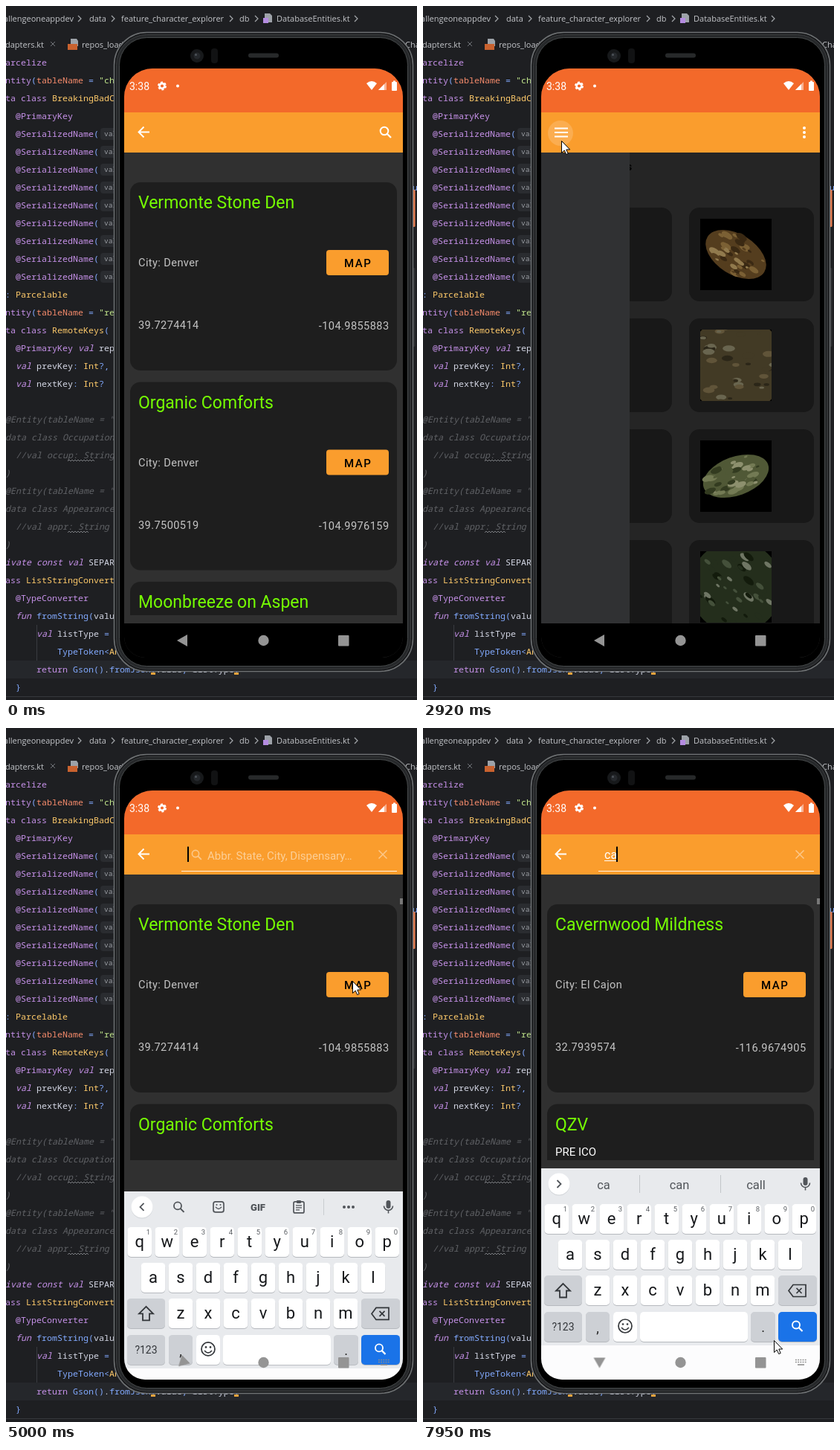
These frames come from a looping animation (553 px wide and 933 px high, 8000 ms). An HTML page:

```html
<!DOCTYPE html>
<html lang="en">
<head>
<meta charset="utf-8">
<title>Dispensary search</title>
<style>
html, body { margin: 0; width: 100%; height: 100%; overflow: hidden; background: #1e1f22; }
svg { display: block; }
text { white-space: pre; }
.code { font: 11.67px "Noto Sans Mono", monospace; fill: #d5d8e6; }
.ide { font: 11px "Open Sans", sans-serif; fill: #c3c5c9; }
.app { font-family: Roboto, sans-serif; }
.kw { fill: #c792ea; }
.it { fill: #c792ea; font-style: italic; }
.type { fill: #ffcb6b; }
.fn { fill: #82aaff; }
.arg { fill: #f78c6c; }
.str { fill: #c3e88d; }
.note { fill: #606266; font-style: italic; }
.title { font-size: 23px; fill: #76ff03; }
.info { font-size: 14.6px; letter-spacing: .4px; fill: #c4c4c4; }
.map { font-size: 15px; font-weight: 500; letter-spacing: 1.5px; fill: #000; }
</style>
</head>
<body>
<script>
const LOOP = 8000;
const ORANGE = '#fa9d2d';
let css = '';

// Timing: all keyframes are written in milliseconds of the loop
function animate(id, frames, ease = 'linear') {
  const steps = frames.map(([ms, rule]) => `${ms / LOOP * 100}%{${rule}}`).join('');
  css += `#${id}{animation:${id} ${LOOP}ms ${ease} infinite}@keyframes ${id}{${steps}}`;
}

function show(id, ...spans) {
  const frames = [];
  if (spans[0][0] > 0) frames.push([0, 'opacity:0']);
  for (const [from, to] of spans) {
    frames.push([from, 'opacity:1']);
    if (to < LOOP) frames.push([to, 'opacity:0']);
  }
  const last = frames[frames.length - 1][1];
  animate(id, [...frames, [LOOP, last]], 'step-end');
}

// Drawing helpers
const g = (id, ...parts) => `<g id="${id}">${parts.join('')}</g>`;
const rect = (x, y, w, h, fill, r = 0, more = '') =>
  `<rect x="${x}" y="${y}" width="${w}" height="${h}" rx="${r}" fill="${fill}" ${more}/>`;
const circle = (x, y, r, fill, more = '') => `<circle cx="${x}" cy="${y}" r="${r}" fill="${fill}" ${more}/>`;
const line = (d, color, w = 1, more = '') =>
  `<path d="${d}" fill="none" stroke="${color}" stroke-width="${w}" ${more}/>`;
const shape = (d, fill, more = '') => `<path d="${d}" fill="${fill}" ${more}/>`;
const text = (x, y, str, cls, more = '') => `<text x="${x}" y="${y}" class="${cls}" ${more}>${str}</text>`;
const label = (x, y, str, size, fill, more = '') =>
  text(x, y, str, 'app', `font-size="${size}" fill="${fill}" text-anchor="middle" ${more}`);
const lens = (x, y, r, color, w) =>
  circle(x - 2, y - 2, r, 'none', `stroke="${color}" stroke-width="${w}"`) +
  line(`M${x - 2 + r * .7} ${y - 2 + r * .7}l${r} ${r}`, color, w * 1.15);
const cross = (x, y, r, color, w) =>
  line(`M${x - r} ${y - r}l${2 * r} ${2 * r}m0 ${-2 * r}l${-2 * r} ${2 * r}`, color, w);

// Editor
const source = `@Parcelize
@Entity(tableName = "characters")
data class BreakingBadC
    @PrimaryKey
${'    @SerializedName(\n'.repeat(9)}) : Parcelable
@Entity(tableName = "remote")
data class RemoteKeys(
    @PrimaryKey val rep
    val prevKey: Int?,
    val nextKey: Int?

//@Entity(tableName = "
//data class Occupation
//  //val occup: String
//)
//@Entity(tableName = "
//data class Appearance
//  //val appr: String
//)
private const val SEPAR
class ListStringConvert
    @TypeConverter
    fun fromString(valu
        val listType =
            TypeToken<An
        return Gson().fromJson(value, listType)
    }`.split('\n');

const span = (cls, str) => `<tspan class="${cls}">${str}</tspan>`;
const rules = [
  ['str', /"[^"]*"?/], ['kw', /@\w+|\b(?:data|class|return)\b/], ['it', /\b(?:private|const|val|fun)\b/],
  ['type', /\b(?:Int|Parcelable|BreakingBadC|RemoteKeys|ListStringConvert|An)\b/],
  ['fn', /\b(?:fromString|fromJson|Gson|TypeToken)\b|[(){}<>:=?,]/], ['arg', /\btableName\b/]
];
const lexer = new RegExp(rules.map(([, re]) => `(${re.source})`).join('|'), 'g');
const escape = s => s.replace('<', '&lt;').replace('>', '&gt;');
const paint = src => src.startsWith('//') ? span('note', src)
  : src.replace(lexer, (hit, ...found) => span(rules[found.findIndex(Boolean)][0], escape(hit)));

const squiggle = (x, y, w) => line(`M${x} ${y}` + 'l2 -2l2 2'.repeat(w / 4), '#85878c', .9);
const chevron = x => line(`M${x - 2} 13l4 4l-4 4`, '#a4a7ab', 1.2);

const editor = () => [
  rect(0, 0, 553, 933, '#1e1f22'),
  rect(0, 880, 553, 24, '#25272b'),
  line('M0 928.5H553', '#36383c'),
  line('M41.5 832V880', '#393b40'),
  text(91, 21, 'allengeoneappdev', 'ide', 'text-anchor="end"'),
  text(112, 21, 'data', 'ide'),
  text(155, 21, 'feature_character_explorer', 'ide'),
  text(314, 21, 'db', 'ide'),
  text(364, 21, 'DatabaseEntities.kt', 'ide'),
  ...[99, 144, 303, 337, 471].map(chevron),
  shape('M348 10h7l3 3v9h-10z', '#9da2a8'), rect(346, 16, 7, 7, '#b48ce0'),
  text(51, 56, 'dapters.kt', 'ide', 'text-anchor="end"'),
  cross(63, 51, 3, '#74777c', 1),
  shape('M87 44h8l2 3v7h-10z', '#9da2a8'), rect(83, 51, 13, 8, '#c9622f'),
  text(102, 56, 'repos_load', 'ide'), text(537, 56, 'Cha', 'ide'),
  ...source.map((src, i) => text(-15, 80 + 24 * i, paint(src), 'code')),
  ...Array.from({length: 9}, (_, i) => rect(127, 164 + 24 * i, 40, 16, '#2a2c30', 4) +
    text(132, 175 + 24 * i, 'value:', 'code', 'style="font-size:9.5px;fill:#9b9ea4"')),
  squiggle(83, 612, 36), squiggle(83, 708, 28),
  text(547, 248, 'u', 'code', 'style="fill:#82aaff"')
].join('');

// Phone body
const phone = () => [
  rect(546, 247, 4.5, 50, '#f08050', 1.5), rect(546, 352, 4.5, 106, '#303234', 1.5),
  rect(145.5, 35.5, 402, 859, '#17181a', 44, 'stroke="#6e7173" stroke-width="1.5"'),
  rect(148.5, 38.5, 396, 853, '#26282a', 41, 'stroke="#3c3e40"'),
  rect(152.5, 42.5, 388, 845, '#000', 37, 'stroke="#55585a" stroke-width=".8"'),
  circle(257, 67, 9, '#17191b'), circle(257, 67, 4.5, '#25282c'), circle(255.5, 65.5, 1.5, '#4d5359'),
  rect(276, 57, 9, 20, '#111213', 4), rect(326, 63.5, 41, 6, '#27292a', 3)
].join('');

// Dispensary list
const PITCH = 268.5;
const entry = (i, name, city, lat, lng) => {
  const y = 237 + PITCH * i;
  return text(178, y + 35, name, 'app title') + (city ? text(178, y + 113, `City: ${city}`, 'app info') +
    text(178, y + 197, lat, 'app info') +
    text(515.5, y + 198, lng, 'app info', 'text-anchor="end"') : '');
};
const card = i => rect(167, 237 + PITCH * i, 359, 253, '#1e1e1e', 14) +
  rect(431, 328 + PITCH * i, 84, 34, ORANGE, 4) + text(455, 351 + PITCH * i, 'MAP', 'app map');

const list = () => g('list', card(0), card(1), card(2),
  g('before', entry(0, 'Vermonte Stone Den', 'Denver', '39.7274414', '-104.9855883'),
    entry(1, 'Organic Comforts', 'Denver', '39.7500519', '-104.9976159'),
    entry(2, 'Moonbreeze on Aspen')),
  g('after', entry(0, 'Cavernwood Mildness', 'El Cajon', '32.7939574', '-116.9674905'),
    entry(1, 'QZV'), text(178, 575, 'PRE ICO', 'app', 'font-size="15" fill="#fff"')),
  rect(159, 819, 375, 11, '#303030'),
  g('cover', rect(159, 581, 375, 249, '#303030')),
  g('bar', rect(530, 229, 4, 25, '#8a8a8a')), g('barRest', rect(530, 229, 4, 8, '#777')));

// Photo grid
function random(seed) {
  return () => (seed = seed * 16807 % 2147483647) / 2147483647;
}
function photo(x, y, seed, tones, rx, ry, turn) {
  const next = random(seed * 7919);
  const dabs = Array.from({length: 46}, (_, i) => {
    const a = next() * 6.283, d = Math.sqrt(next()) * .9, size = 2.5 + next() * 6;
    return `<ellipse cx="${(d * rx * Math.cos(a)).toFixed(1)}" cy="${(d * ry * Math.sin(a)).toFixed(1)}"
      rx="${size.toFixed(1)}" ry="${(size * .5).toFixed(1)}" fill="${tones[i % tones.length]}"/>`;
  });
  return `<svg x="${x}" y="${y}" width="96" height="96">${rect(0, 0, 96, 96, '#000')}
    <g transform="translate(48 48) rotate(${turn})"><ellipse rx="${rx}" ry="${ry}" fill="${tones[0]}"/>${dabs.join('')}</g></svg>`;
}
const gold = ['#6b4d26', '#9c7a42', '#4a3418', '#b89a62'];
const dusk = ['#54492f', '#7a6a48', '#37301f', '#858064'];
const moss = ['#657044', '#929a6a', '#404b29', '#b3b68c'];
const leaf = ['#2d3a24', '#56654a', '#18220f', '#8d957f'];
const looks = [[gold, 45, 27, 32], [dusk, 66, 66, 0], [moss, 46, 26, -20], [leaf, 62, 62, 40]];
const grid = () => g('grid', text(167, 221, 'Cannabis Strains', 'app', 'font-size="15" font-weight="700"'),
  ...looks.flatMap((look, row) => [167, 358].map((x, col) => {
    const y = 271 + 149 * row;
    return rect(x, y, 168, 126, '#1e1e1e', 14) +
      photo(x + 15, y + 15, row * 2 + col + 3, ...looks[(row + 1 - col) % 4].slice(0, 4));
  })),
  g('scrim', rect(159, 197, 375, 633, '#000')),
);
const drawer = () => g('drawer', rect(159, 197, 255, 633, '#303133'),
  text(175, 236, 'Strains', 'app', 'font-size="13" fill="#ddd"'),
  text(175, 280, 'Dispensaries', 'app', 'font-size="13" fill="#ddd"'));

// Status and tool bar
const header = () => [
  rect(159, 84, 375, 59, '#f3692a'), rect(159, 143, 375, 54, ORANGE),
  text(166, 113, '3:38', 'app', 'font-size="14" fill="#fff"'),
  circle(210, 107.5, 3.4, 'none', 'stroke="#fff" stroke-width="2.6"'),
  circle(210, 107.5, 5, 'none', 'stroke="#fff" stroke-width="2" stroke-dasharray="2.9 2.34"'),
  circle(231, 107.5, 2, '#fff'),
  shape('M485 104Q492 98 499 104L492 113Z', '#fff'),
  shape('M501 113h11v-11z', '#fff', 'opacity=".5"'), shape('M501 113h8v-8z', '#fff'),
  rect(519, 102, 7, 12, '#fff', 1), rect(521, 100.5, 3, 2, '#fff'),
  g('back', line('M193 169.5H179m6.5 -7l-7 7l7 7', '#fff', 1.9)),
  g('ripple', circle(185, 171, 17, '#fff', 'opacity=".17"')),
  g('menu', line('M177 164.5h18m-18 5.5h18m-18 5.5h18', '#fff', 1.8),
    ...[164, 170, 176].map(y => circle(513, y, 2, '#fff'))),
  g('find', lens(511, 170, 5.3, '#fff', 2)),
  g('field', line('M236 192.5H526', '#fff', 1, 'opacity=".85"'), cross(507, 170, 5.5, '#fcc88a', 1.5),
    g('hint', lens(257, 171, 4.6, '#fcc88a', 1.6),
      text(271, 177, 'Abbr. State, City, Dispensary…', 'app', 'font-size="15" fill="#fccf97"')),
    g('one', text(244, 176, 'c', 'app', 'font-size="16" fill="#fff"'), line('M244 178.5h8', '#fff')),
    g('two', text(244, 176, 'ca', 'app', 'font-size="16" fill="#fff"'), line('M244 178.5h16', '#fff')),
    g('blink', g('caret', rect(244, 159.5, 2, 20.5, '#000'))))
].join('');

// Keyboard
const GREY = '#cdd0d5', INK = '#51555a';
const cap = (x, y, w, fill) => rect(x, y + 1, w, 40, '#b6b9be', 5) + rect(x, y, w, 40, fill, 5);
const row = (letters, x, y) => [...letters].map((c, i) =>
  cap(x + 37 * i - 16.3, y, 32.6, '#fff') + label(x + 37 * i, y + 27, c, 22, '#16181b')).join('');
const keyboard = () => g('keyboard',
  rect(159, 592, 375, 238, '#e8eaed'), rect(159, 830, 375, 46, '#fcfcfd'),
  circle(183, 614, 14.5, '#cfd2d6'), circle(183, 613, 14.5, '#fff'),
  g('tools', line('M185.5 608l-5 5l5 5', INK, 1.8), lens(233, 613.5, 5, INK, 1.8),
    rect(279, 606, 14, 14, 'none', 3, `stroke="${INK}" stroke-width="1.7"`), line('M282 613q4 5 8 0', INK, 1.5),
    circle(283.5, 610, 1, INK), circle(288.5, 610, 1, INK),
    label(339, 618, 'GIF', 13, INK, 'font-weight="900"'),
    rect(387, 606, 14, 15, 'none', 2, `stroke="${INK}" stroke-width="1.7"`), rect(391, 604, 6, 4, INK, 1),
    line('M390 611h8m-8 3h8m-8 3h5', INK, 1.2), line('M427.5 602v22', '#c9ccd0'),
    ...[455, 461, 467].map(x => circle(x, 613, 2, INK))),
  g('words', line('M180.5 608l5 5l-5 5', INK, 1.8), line('M291.5 601v24M400.5 601v24', '#c2c5c9'),
    g('wordOne', label(243, 620, 'c', 16.5, INK)), g('wordTwo', label(243, 620, 'ca', 16.5, INK)),
    label(345, 620, 'can', 16.5, INK), label(448, 620, 'call', 16.5, INK)),
  rect(511.5, 604, 6, 11, INK, 3), line('M508.5 611.5a6 6 0 0 0 12 0M514.5 617.5v4', INK, 1.6),
  row('qwertyuiop', 179.7, 640), row('asdfghjkl', 198, 688), row('zxcvbnm', 235, 736),
  ...[...'1234567890'].map((n, i) => label(191.5 + 37 * i, 650, n, 9.5, '#5a5e63')),
  cap(163, 736, 51, GREY), line('M188.500 747l-9.500 9.500h5v9h9v-9h5z', '#33363a', 1.8),
  cap(478, 736, 52, GREY), line('M492 756.5l6 -8h17v16h-17zm10.500 -3.500l7 7m0 -7l-7 7', '#33363a', 1.7),
  cap(163, 785, 51, GREY), label(188.5, 810, '?123', 14, '#33363a'),
  cap(219, 785, 32, GREY), label(235, 813, ',', 18, '#222'),
  cap(256, 785, 32, '#fff'), circle(272, 804, 9, 'none', 'stroke="#33363a" stroke-width="1.7"'),
  circle(269, 801.5, 1.3, '#33363a'), circle(275, 801.5, 1.3, '#33363a'), line('M267 806q5 6 10 0', '#33363a', 1.6),
  cap(292, 785, 145, '#fff'), cap(441, 785, 33, GREY), label(457.500, 812, '.', 18, '#222'),
  cap(478, 785, 52, '#1a73e8'), lens(504, 804.5, 5, '#fff', 1.9));

const navigation = () => g('triangle', shape('M230 853L244 845V861Z', '#949494')) +
  circle(346.5, 853, 7.2, '#949494') + rect(447, 846, 14.5, 14.500, '#949494', 1) +
  g('switch', line('M501 849.500h15m-15 3h15', '#8d8d8d', 1.6, 'stroke-dasharray="1.8 1.4"') +
    line('M504 856h9', '#8d8d8d', 1.6));

const screen = () => `<g clip-path="url(#glass)">${[
  rect(159, 84, 375, 792, '#303030'), list(), grid(), drawer(),
  g('dot', rect(345.5, 386, 4.500, 4, '#161616', 1)),
  header(), rect(159, 830, 375, 46, '#000'), keyboard(), navigation()].join('')}</g>`;

const mouse = () => g('pointer', g('mouse', g('click', circle(0, 0, 12, '#f8d80c', 'opacity=".68"')),
  shape('M.5 .5V16.500L4.200 13L6.700 18.500L9.200 17.500L6.800 12H11.700Z', '#fff', 'stroke="#000"')));

// Timeline
show('list', [0, 2450], [4110, 6700], [7040, LOOP]);
show('before', [0, 7200]);
animate('after', [[0, 'opacity:0'], [7180, 'opacity:0'], [7380, 'opacity:1'], [LOOP, 'opacity:1']]);
show('cover', [4950, LOOP]);
show('bar', [4110, 4930]);
show('barRest', [4930, LOOP]);
show('grid', [2450, 3640]);
show('back', [0, 2450], [3640, LOOP]);
show('menu', [2450, 3640]);
show('ripple', [2300, 2430], [2800, 3150]);
show('find', [0, 2450], [3640, 4850]);
show('field', [4850, LOOP]);
show('hint', [4850, 6150]);
show('one', [6150, 6490]);
show('two', [6490, LOOP]);
show('blink', [4850, 5350], [5850, 6980], [7480, LOOP]);
show('tools', [0, 6350]);
show('words', [6350, LOOP]);
show('wordOne', [6350, 6490]);
show('wordTwo', [6490, LOOP]);
show('dot', [6770, 7000]);
show('switch', [4980, LOOP]);
show('pointer', [140, LOOP]);
show('click', [2270, 2400], [2750, 2850], [3520, 3640], [4590, 4750]);

const moveX = x => `transform:translateX(${x}px)`;
const moveY = y => `transform:translateY(${y}px)`;
const quint = ';animation-timing-function:cubic-bezier(.22,1,.36,1)';
const cubic = ';animation-timing-function:cubic-bezier(.215,.61,.355,1)';
animate('caret', [[0, moveX(0)], [6150, moveX(8)], [6490, moveX(16)], [LOOP, moveX(16)]], 'step-end');
animate('drawer', [[0, moveX(-255)], [2873, moveX(-255) + quint], [3273, moveX(0)],
  [3620, moveX(0) + quint], [4020, moveX(-255)], [LOOP, moveX(-255)]]);
animate('scrim', [[0, 'opacity:0'], [2873, 'opacity:0' + quint], [3273, 'opacity:.45'],
  [3620, 'opacity:.45' + quint], [4020, 'opacity:0'], [LOOP, 'opacity:0']]);
animate('keyboard', [[0, moveY(284)], [4880, moveY(284) + cubic], [5110, moveY(0)], [LOOP, moveY(0)]]);
css += '#triangle{transform-origin:237.500px 853px}';
animate('triangle', [[0, 'transform:rotate(0deg)'], [4880, 'transform:rotate(0deg)'],
  [5130, 'transform:rotate(-90deg)'], [LOOP, 'transform:rotate(-90deg)']]);

const route = [
  [0, 405, 655], [140, 405, 655], [200, 360, 500], [270, 275, 290], [330, 236, 211], [590, 236, 211],
  [670, 227, 211], [1330, 226, 211], [1400, 218, 209], [1590, 218, 209], [1720, 156, 99], [1920, 162, 130],
  [2080, 180, 168], [2380, 185, 176], [2920, 186, 181], [3240, 186, 181], [3520, 230, 262], [3680, 230, 262],
  [4030, 260, 270], [4440, 505, 175], [4560, 515, 164], [4750, 515, 164], [4880, 510, 215], [5000, 466, 340],
  [5120, 452, 342], [5350, 448, 337], [5810, 448, 337], [5950, 447, 337], [7170, 447, 337], [7945, 472, 823],
  [LOOP, 472, 823]
];
animate('mouse', route.map(([ms, x, y]) => [ms, `transform:translate(${x}px,${y}px)` +
  (ms === 7170 ? ';animation-timing-function:ease-in-out' : '')]));

document.body.innerHTML = `<style>${css}</style>
<svg width="553" height="933" viewBox="0 0 553 933">
<clipPath id="glass"><path d="M159 122a38 38 0 0 1 38 -38H496a38 38 0 0 1 38 38V848a28 28 0 0 1 -28 28H187a28 28 0 0 1 -28 -28Z"/></clipPath>
${editor()}${phone()}${rect(195, 896, 6, 3, '#e8a33d')}${rect(307, 896, 6, 3, '#e8a33d')}${screen()}${mouse()}
</svg>`;
</script>
</body>
</html>
```
